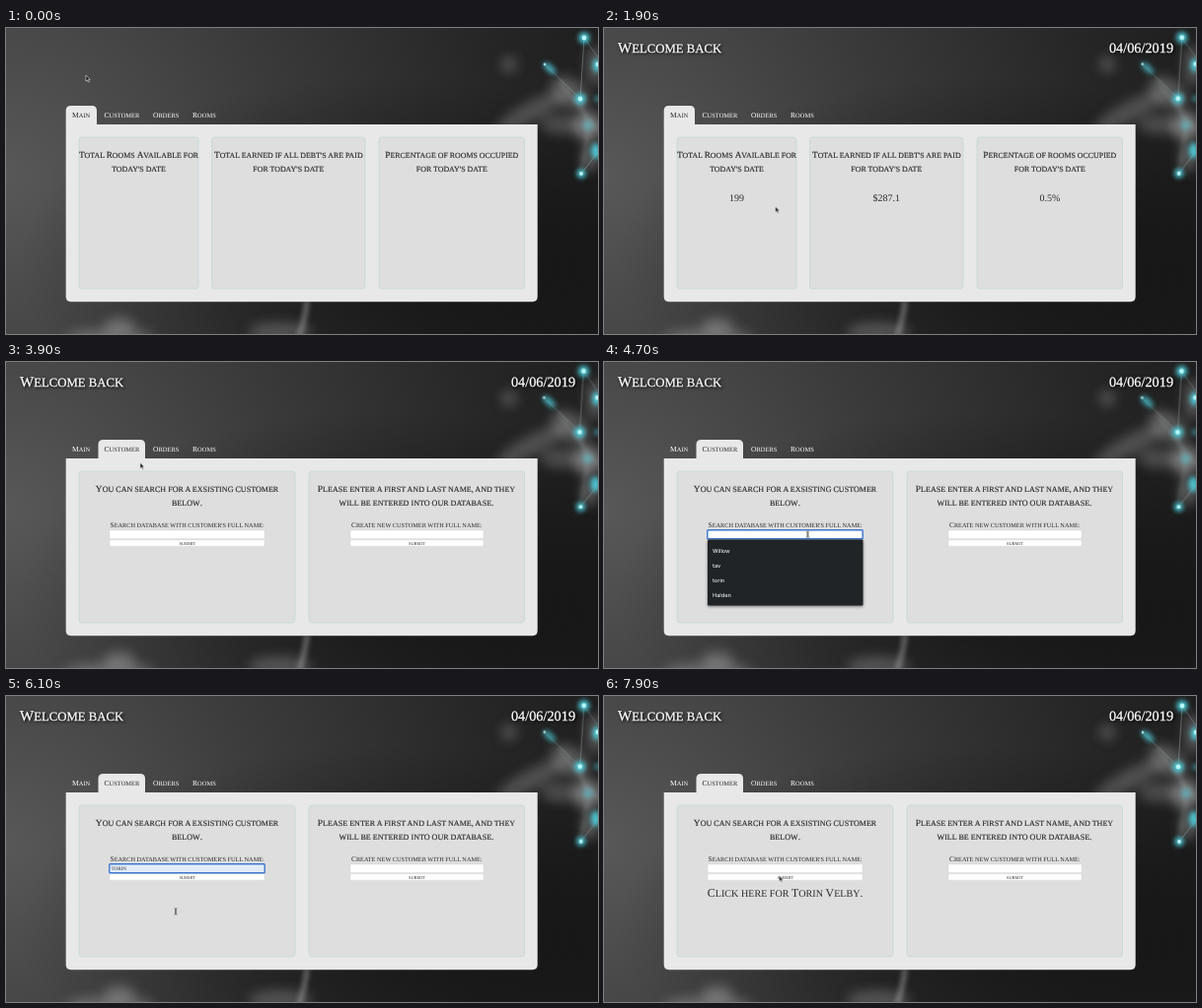
These frames come from a looping animation (600x311 px, 8 s). An HTML page:

```html
<!DOCTYPE html>
<html lang="en">
<head>
<meta charset="utf-8">
<title>Hotel dashboard</title>
<style>
html, body { margin: 0; width: 100%; height: 100%; overflow: hidden; background: #222; }
svg { display: block; width: 100vw; height: 100vh; }
text {
  font-family: "Liberation Serif", "Noto Serif", serif;
  fill: #2a2a2a; white-space: pre; text-rendering: geometricPrecision;
}
.head text { stroke: #2a2a2a; stroke-width: .14; }
.light text { fill: #fff; }
.sans text { font-family: Inter, Roboto, sans-serif; font-weight: 500; fill: #e8eaed; }
.preview text { fill: #111; }
.glow { filter: drop-shadow(1px 1px 1.5px #000); }
.glow text { stroke: #fff; stroke-width: .25; }
.panel { fill: #e8e8e8; }
.card { fill: #dedede; stroke: #c2dad7; stroke-width: .8; }
.field { fill: #fff; stroke: #cfcfcf; stroke-width: .4; }

.timed { animation: 8s step-end infinite; }
#greet { animation-name: greet; }
#main { animation-name: main; }
#customer { animation-name: customer; }
#focus { animation-name: focus; }
#menu { animation-name: menu; }
#fill { animation-name: fill; }
#typed { animation-name: typed; }
#result { animation-name: result; }
#row0 { animation-name: row0; }
#row1 { animation-name: row1; }
#row2 { animation-name: row2; }
#arrow { animation-name: arrow; }
#hand { animation-name: hand; }
#beam { animation-name: beam; }
#cursor { animation: path 8s linear infinite; }
#net { animation: drift 8s ease-in-out infinite; }
#spark { animation: spark 4s ease-in-out infinite; }

@keyframes greet { 0% { opacity: 0 } 3.75%, 100% { opacity: 1 } }
@keyframes main { 0% { opacity: 1 } 43.75%, 100% { opacity: 0 } }
@keyframes customer { 0% { opacity: 0 } 43.75%, 100% { opacity: 1 } }
@keyframes focus { 0% { opacity: 0 } 58.75% { opacity: 1 } 90%, 100% { opacity: 0 } }
@keyframes menu { 0% { opacity: 0 } 58.75% { opacity: 1 } 76.25%, 100% { opacity: 0 } }
@keyframes fill { 0% { opacity: 0 } 66.25% { opacity: 1 } 93.75%, 100% { opacity: 0 } }
@keyframes typed { 0% { opacity: 0 } 76.25% { opacity: 1 } 93.75%, 100% { opacity: 0 } }
@keyframes result { 0% { opacity: 0 } 93.75%, 100% { opacity: 1 } }
@keyframes row0 { 0% { opacity: 0 } 66.25% { opacity: 1 } 68.75%, 100% { opacity: 0 } }
@keyframes row1 { 0% { opacity: 0 } 68.75% { opacity: 1 } 72.5%, 100% { opacity: 0 } }
@keyframes row2 { 0% { opacity: 0 } 72.5% { opacity: 1 } 76.25%, 100% { opacity: 0 } }
@keyframes arrow {
  0% { opacity: 1 } 33% { opacity: 0 } 48.5% { opacity: 1 }
  56% { opacity: 0 } 77.5%, 100% { opacity: 1 }
}
@keyframes hand { 0% { opacity: 0 } 33% { opacity: 1 } 48.5%, 100% { opacity: 0 } }
@keyframes beam { 0% { opacity: 0 } 56% { opacity: 1 } 77.5%, 100% { opacity: 0 } }
@keyframes path {
  0%, 15% { transform: translate(81px, 48px) }
  20% { transform: translate(130px, 140px) }
  25% { transform: translate(188px, 195px) }
  26.25% { transform: translate(190px, 177px) }
  31.25% { transform: translate(176px, 120px) }
  33.75%, 36.25% { transform: translate(168px, 96px) }
  41.25%, 47.5% { transform: translate(124px, 90px) }
  56.25%, 65% { transform: translate(206.5px, 175px) }
  66.25% { transform: translate(195px, 189px) }
  70% { transform: translate(162px, 206px) }
  73.75%, 81.25% { transform: translate(172px, 219px) }
  87.5% { transform: translate(176.5px, 181px) }
  90%, 100% { transform: translate(177.5px, 182.5px) }
}
@keyframes drift { 50% { transform: translate(-.6px, -.7px) } }
@keyframes spark { 50% { opacity: .7 } }
</style>
</head>
<body>
<svg viewBox="0 0 600 311" preserveAspectRatio="none">
  <defs>
    <radialGradient id="bg" gradientUnits="userSpaceOnUse" cx="0" cy="150" r="630">
      <stop offset="0" stop-color="#585858"/>
      <stop offset=".45" stop-color="#3a3a3a"/>
      <stop offset=".8" stop-color="#262626"/>
      <stop offset="1" stop-color="#1e1e1e"/>
    </radialGradient>
    <radialGradient id="shade" cx=".64" cy=".78" r=".62">
      <stop offset="0" stop-opacity=".5"/>
      <stop offset=".5" stop-opacity=".3"/>
      <stop offset="1" stop-opacity="0"/>
    </radialGradient>
    <filter id="soft" x="-100%" y="-100%" width="300%" height="300%"><feGaussianBlur stdDeviation="6"/></filter>
    <filter id="haze" x="-100%" y="-100%" width="300%" height="300%"><feGaussianBlur stdDeviation="2.5"/></filter>
  </defs>
  <rect width="600" height="311" fill="url(#bg)"/>
  <rect width="600" height="311" fill="url(#shade)"/>

  <g fill="#bbb" filter="url(#soft)">
    <ellipse cx="534" cy="84" rx="42" ry="10" transform="rotate(-28 534 84)" opacity=".3"/>
    <ellipse cx="572" cy="66" rx="22" ry="14" transform="rotate(35 572 66)" opacity=".34"/>
    <circle cx="590" cy="100" r="15" opacity=".55"/>
    <ellipse cx="562" cy="98" rx="20" ry="10" opacity=".28"/>
    <ellipse cx="592" cy="132" rx="9" ry="14" opacity=".38"/>
    <ellipse cx="597" cy="38" rx="9" ry="20" opacity=".35"/>
    <circle cx="510" cy="37" r="8" opacity=".3"/>
    <ellipse cx="115" cy="303" rx="16" ry="9" opacity=".36"/>
    <ellipse cx="105" cy="314" rx="45" ry="8" opacity=".36"/>
    <ellipse cx="278" cy="309" rx="32" ry="10" opacity=".3"/>
  </g>
  <path d="M305 277Q304 292 297 314" fill="none" stroke="#ccc" stroke-width="5" opacity=".42" filter="url(#haze)"/>

  <g id="net">
    <g fill="none" stroke="#b5c2c4">
      <path d="M546 37 582 72M586 10 600 30" stroke-width="1" opacity=".3"/>
      <path d="M586 10 582 72M583 148 600 126" stroke-width=".8" opacity=".5"/>
      <path d="M582 72 590 105 583 148M560 52 600 105" stroke-width="2.500" opacity=".35" filter="url(#haze)"/>
    </g>
    <g fill="#4fd0de" filter="url(#haze)">
      <circle cx="586" cy="10" r="5.500"/>
      <circle cx="582" cy="72" r="5.500"/>
      <circle cx="583" cy="148" r="4.500"/>
      <ellipse id="spark" cx="551" cy="41" rx="8" ry="3.500" transform="rotate(42 551 41)" opacity=".8"/>
      <ellipse cx="599" cy="38" rx="4" ry="7"/>
      <circle cx="600" cy="72" r="3" opacity=".7"/>
      <ellipse cx="598" cy="125" rx="5" ry="8" opacity=".9"/>
      <circle cx="590" cy="99" r="5" opacity=".5"/>
    </g>
    <g fill="#b5f6f8">
      <circle cx="586" cy="10" r="2.400"/>
      <circle cx="582" cy="72" r="2.400"/>
      <circle cx="583" cy="148" r="1.900"/>
      <circle cx="546" cy="37" r="1.400" opacity=".8"/>
      <circle cx="600" cy="37" r="2.400"/>
    </g>
  </g>

  <g id="greet" class="timed">
    <g id="title" class="light glow"></g>
  </g>
  <path class="panel" d="M60.700 98H538.700V273Q538.700 278.200 533.700 278.200H65.700Q60.700 278.200 60.700 273Z"/>

  <g id="main" class="timed">
    <path class="panel" d="M60.700 98.500V84Q60.700 79 65.700 79H87Q92 79 92 84V98.500Z"/>
    <rect class="card" x="74" y="111" width="121" height="154" rx="3"/>
    <rect class="card" x="208.500" y="111" width="155.500" height="154" rx="3"/>
    <rect class="card" x="378" y="111" width="147.500" height="154" rx="3"/>
    <g id="mainTab"></g>
    <g id="mainTabs" class="light"></g>
    <g id="mainHead" class="head"></g>
    <g id="values" class="timed" style="animation-name: greet"></g>
  </g>

  <g id="customer" class="timed">
    <path class="panel" d="M93.500 98.500V84Q93.500 79 98.500 79H136Q141 79 141 84V98.500Z"/>
    <rect class="card" x="74" y="111" width="219" height="154" rx="3"/>
    <rect class="card" x="307" y="111" width="218.500" height="154" rx="3"/>
    <g id="custTab"></g>
    <g id="custTabs" class="light"></g>
    <g id="custHead" class="head"></g>
    <rect class="field" x="105" y="171" width="157" height="8.600"/>
    <rect class="field" x="105" y="180.800" width="157" height="6.400" rx="1"/>
    <rect class="field" x="349" y="171" width="135" height="8.600"/>
    <rect class="field" x="349" y="180.800" width="135" height="6.400" rx="1"/>
    <g id="labels"></g>
    <rect id="fill" class="timed" x="105.500" y="171.500" width="156" height="7.800" fill="#e3ecf8"/>
    <g id="typed" class="timed"></g>
    <rect id="focus" class="timed" x="104.800" y="170.800" width="157.400" height="9" rx=".8" fill="none" stroke="#3d78d0" stroke-width="1.400"/>
    <g id="result" class="timed"></g>
    <g id="menu" class="timed">
      <rect x="105" y="180.500" width="157.500" height="67" rx="1" fill="#202426" style="filter: drop-shadow(0 1px 1.500px #0008)"/>
      <g id="rows"></g>
      <g id="names" class="sans"></g>
    </g>
  </g>

  <g id="cursor">
    <path id="arrow" class="timed" d="M0 0V6L1.400 4.800 2.400 7 3.400 6.500 2.500 4.400H4.300Z" fill="#111" stroke="#fff" stroke-width=".55"/>
    <path id="hand" class="timed" d="M-.7 0Q0-.8.6 0V2.500L3 3.200Q3.600 3.500 3.400 4.500L2.800 7H-.4L-2.400 4.200Q-2.200 3.400-.7 4.300Z" fill="#fff" stroke="#222" stroke-width=".6"/>
    <g id="beam" class="timed" fill="none">
      <path d="M-1.500-3.300Q0-3.300 0-2.300V2.300Q0 3.300-1.500 3.300M1.500-3.300Q0-3.300 0-2.300V2.300Q0 3.300 1.500 3.300" stroke="#fff" stroke-width="1.500"/>
      <path d="M-1.500-3.300Q0-3.300 0-2.300V2.300Q0 3.300-1.500 3.300M1.500-3.300Q0-3.300 0-2.300V2.300Q0 3.300 1.500 3.300" stroke="#222" stroke-width=".7"/>
    </g>
  </g>
</svg>
<script>
const make = (parent, tag, attrs) => {
  const el = document.createElementNS("http://www.w3.org/2000/svg", tag);
  for (const key in attrs) el.setAttribute(key, attrs[key]);
  return parent.appendChild(el);
};
const plain = (parent, x, y, size, str) => {
  make(parent, "text", { x, y, "font-size": size }).textContent = str;
};
// Capitals at full size, lower case as tall small capitals.
const caps = (id, x, y, size, str, anchor = "middle") => {
  const el = make(document.getElementById(id), "text", { x, y, "font-size": size, "text-anchor": anchor });
  for (const run of str.match(/[A-Z0-9$%.\/]+|[^A-Z0-9$%.\/]+/g)) {
    const small = /[a-z]/.test(run);
    make(el, "tspan", { "font-size": small ? size * .85 : size }).textContent = run.toUpperCase();
  }
};

caps("title", 14, 25, 15, "Welcome back", "start");
caps("title", 544.5, 24.5, 14.3, "04/06/2019");

const tabs = [["Main", 67], ["Customer", 99.5], ["Orders", 149], ["Rooms", 189]];
tabs.forEach(([name, x], i) => {
  caps(i === 0 ? "mainTab" : "mainTabs", x, 91, 7.6, name, "start");
  caps(i === 1 ? "custTab" : "custTabs", x, 91, 7.6, name, "start");
});

const stats = [
  [134.5, "Total Rooms Available for", "today's date", "199"],
  [286.3, "Total earned if all debt's are paid", "for today's date", "$287.1"],
  [451.8, "Percentage of rooms occupied", "for today's date", "0.5%"]
];
for (const [x, top, bottom, value] of stats) {
  caps("mainHead", x, 132.3, 9.3, top);
  caps("mainHead", x, 145.6, 9.3, bottom);
  caps("values", x, 176, 10, value);
}

const heads = [
  [183.5, "You can search for a exsisting customer", "below."],
  [416, "Please enter a first and last name, and they", "will be entered into our database."]
];
for (const [x, top, bottom] of heads) {
  caps("custHead", x, 132.3, 9.5, top);
  caps("custHead", x, 145.6, 9.5, bottom);
}

caps("labels", 183.7, 168, 7.4, "Search database with customer's full name:");
caps("labels", 416.3, 168, 7.4, "Create new customer with full name:");
caps("labels", 183.7, 185.5, 4.4, "SUBMIT");
caps("labels", 416.3, 185.5, 4.4, "SUBMIT");
caps("typed", 106.5, 177, 6, "torin", "start");
caps("result", 183.7, 204, 11.9, "Click here for Torin Velby.");

const rows = document.getElementById("rows");
const names = document.getElementById("names");
["Willow", "tav", "torin", "Halden"].forEach((name, i) => {
  const y = 184 + i * 15.2;
  plain(names, 110, y + 9.5, 5.6, name);
  if (i > 2) return;
  const row = make(rows, "g", { id: "row" + i, class: "timed sans preview" });
  make(row, "rect", { x: 105, y, width: 157.5, height: 15.2, fill: "#3a3c3d" });
  plain(row, 106.5, 177.2, 5.4, name);
});
</script>
</body>
</html>
```
